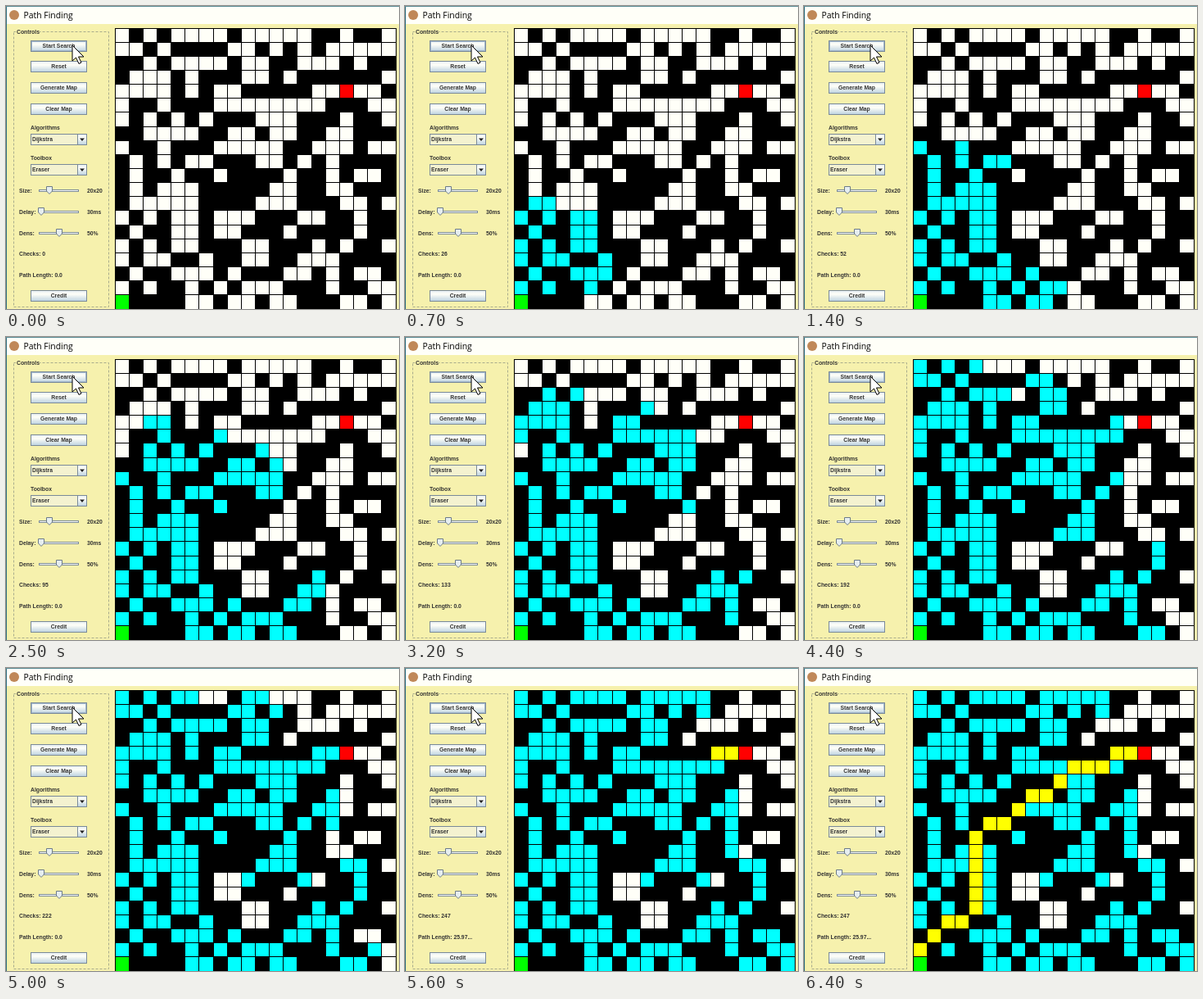
An HTML page with a canvas that plays this animation: 480 px wide and 370 px high, repeating every 6.5 s.

```html
<!DOCTYPE html>
<html lang="en">
<head>
<meta charset="utf-8">
<title>Path Finding</title>
<style>
  html, body { margin: 0; width: 100%; height: 100%; overflow: hidden; background: #f6f1ad; }
  canvas { display: block; }
</style>
</head>
<body>
<canvas id="stage" width="480" height="370"></canvas>
<script>
const ctx = document.getElementById('stage').getContext('2d');
const LOOP = 6500, STEP = 100, CELLS = 20, CELL = 17.15, LEFT = 133, TOP = 27;

// '#' wall, 'o' reached by the search, '.' never reached, S start, F finish
const map = [
  'o#o#oooo#ooooo##.##.',
  'oo#o####oo#o#o#.....',
  '##o#oooo#oo##...#.##',
  '#ooo#o###oo#.######.',
  'oooo#o#oo#####ooF..#',
  'o##o###oooooooo###..',
  'o#o#o#o###ooo###.##.',
  '##oooo##oo#oo##o.###',
  'o##o###ooooo##oo.#..',
  '#o#o#oo###oo#o#o####',
  '#o##o##o####o##o#..#',
  '#o#ooo#####oo##o.###',
  '#ooooo####ooo###oo#.',
  'o#o#oo#..o###o.##o##',
  '#o##oo#..###.####o##',
  'o#o#oo###..###o#o##.',
  'o#oo##o##..##ooo####',
  '#o##ooo#o###oo#o#oo#',
  'o#o##o#o#ooo###o##oo',
  'S####oo#oo#oo###oo#o'
];

// Shortest route, from the finish back to the start
const route = [
  [15, 4], [14, 4], [13, 5], [12, 5], [11, 5], [10, 6], [9, 7],
  [8, 7], [7, 8], [6, 9], [5, 9], [4, 10], [4, 11], [4, 12],
  [4, 13], [4, 14], [4, 15], [3, 16], [2, 16], [1, 17], [0, 18]
];
const ROUTE_START = 5520, ROUTE_STEP = 40;

// Dijkstra with diagonal moves; a cell is revealed when its parent is expanded
function search() {
  const key = (x, y) => y * CELLS + x;
  const open = [{ x: 0, y: 19, cost: 0 }];
  const best = { [key(0, 19)]: 0 }, seen = new Set(), order = [];
  while (open.length) {
    open.sort((a, b) => a.cost - b.cost);
    const node = open.shift();
    if (node.cost > best[key(node.x, node.y)]) continue;
    for (let dx = -1; dx <= 1; dx++) {
      for (let dy = -1; dy <= 1; dy++) {
        const x = node.x + dx, y = node.y + dy, id = key(x, y);
        if (!map[y] || map[y][x] !== 'o') continue;
        const cost = node.cost + Math.hypot(dx, dy);
        if (cost >= (best[id] ?? Infinity) - 1e-9) continue;
        best[id] = cost;
        open.push({ x, y, cost });
        if (!seen.has(id)) {
          seen.add(id);
          order.push({ x, y, at: node.cost });
        }
      }
    }
  }
  return order;
}

const visited = search();

// Progress: time, checks counted, search radius
const progress = [
  [0, 0, 0], [1400, 52, 13], [2500, 95, 18.3],
  [3200, 133, 20.6], [4400, 192, 22.8], [5500, 247, Infinity]
].map(([time, checks, radius]) =>
  ({ time, checks, shown: visited.filter(c => c.at < radius).length }));

function progressAt(t, field) {
  const i = progress.findIndex(p => p.time > t);
  if (i < 0) return progress[progress.length - 1][field];
  const a = progress[i - 1], b = progress[i];
  return Math.round(a[field] + (b[field] - a[field]) * (t - a.time) / (b.time - a.time));
}

function rect(x, y, w, h, fill) {
  ctx.fillStyle = fill;
  ctx.fillRect(x, y, w, h);
}

function outline(x, y, w, h, color) {
  ctx.strokeStyle = color;
  ctx.lineWidth = 1;
  ctx.strokeRect(x + .5, y + .5, w - 1, h - 1);
}

function polygon(points, fill, stroke) {
  ctx.beginPath();
  points.forEach(([x, y]) => ctx.lineTo(x, y));
  ctx.closePath();
  ctx.fillStyle = fill;
  ctx.fill();
  if (stroke) {
    ctx.strokeStyle = stroke;
    ctx.lineWidth = 1;
    ctx.stroke();
  }
}

function label(text, x, y, align = 'left') {
  ctx.font = 'bold 6.8px "Liberation Sans", Arial, sans-serif';
  ctx.textAlign = align;
  ctx.fillStyle = '#333';
  ctx.fillText(text, x, y);
}

function shaded(x, y, w, h) {
  const g = ctx.createLinearGradient(0, y, 0, y + h);
  g.addColorStop(0, '#e4edf2');
  g.addColorStop(.35, '#fffff8');
  g.addColorStop(1, '#b8cfdf');
  rect(x, y, w, h, g);
  outline(x, y, w, h, '#7a8a99');
}

function button(text, y, focused) {
  shaded(30, y, 69, 14);
  if (focused) outline(31, y + 1, 67, 12, '#a3b8cc');
  label(text, 64.5, y + 9.4, 'center');
}

function combo(title, value, y) {
  label(title, 30, y - 5);
  rect(30, y, 69, 14, '#f4f2d0');
  outline(30, y, 69, 14, '#7a8a99');
  label(value, 32, y + 9.4);
  shaded(87, y, 12, 14);
  polygon([[90, y + 5.5], [96, y + 5.5], [93, y + 9]], '#222');
}

function slider(title, value, y, thumb) {
  label(title, 16, y + 2.5);
  label(value, 99, y + 2.5);
  rect(40, y - 1, 49, 3, '#fffff8');
  outline(40, y - 1, 49, 3, '#7a8a99');
  polygon([[thumb - 3.5, y - 4.5], [thumb + 3.5, y - 4.5], [thumb + 3.5, y + 1],
    [thumb, y + 4.5], [thumb - 3.5, y + 1]], '#e6eef0', '#6d7b88');
}

function drawPanel(t) {
  rect(0, 0, 480, 370, '#f6f1ad');
  rect(0, 0, 480, 22, '#fffff8');
  rect(0, 0, 1, 370, '#2f6f80');
  rect(0, 0, 480, 1, '#5c8d96');

  ctx.fillStyle = '#c08858';
  ctx.beginPath();
  ctx.arc(10, 11, 6, 0, 7);
  ctx.fill();
  ctx.font = '10.4px "Open Sans", "Noto Sans", sans-serif';
  ctx.textAlign = 'left';
  ctx.fillStyle = '#000';
  ctx.fillText('Path Finding', 21.5, 14.5);

  ctx.setLineDash([3, 2]);
  outline(9, 31, 117, 337, '#a9ac8c');
  ctx.setLineDash([]);
  rect(12, 28, 29, 7, '#f6f1ad');
  label('Controls', 13, 34);

  button('Start Search', 42, true);
  button('Reset', 67);
  button('Generate Map', 93);
  button('Clear Map', 119);
  combo('Algorithms', 'Dijkstra', 156);
  combo('Toolbox', 'Eraser', 193);
  slider('Size:', '20x20', 225, 53);
  slider('Delay:', '30ms', 251, 43);
  slider('Dens:', '50%', 277, 65);
  label('Checks: ' + progressAt(t, 'checks'), 16, 305);
  label('Path Length: ' + (t >= ROUTE_START ? '25.97...' : '0.0'), 16, 331);
  button('Credit', 347);
}

function cell(x, y, color) {
  const px = Math.floor(LEFT + x * CELL), py = Math.floor(TOP + y * CELL);
  const right = Math.floor(LEFT + (x + 1) * CELL), bottom = Math.floor(TOP + (y + 1) * CELL);
  rect(px + 1, py + 1, right - px - 1, bottom - py - 1, color);
}

function drawGrid(t) {
  const colors = { o: '#fffff8', '.': '#fffff8', S: '#00ff00', F: '#ff0000' };
  rect(LEFT, TOP, 344, 343, '#000');
  map.forEach((row, y) => [...row].forEach((type, x) => {
    if (type !== '#') cell(x, y, colors[type]);
  }));
  visited.slice(0, progressAt(t, 'shown')).forEach(c => cell(c.x, c.y, '#00ffff'));
  const steps = Math.max(0, Math.floor((t - ROUTE_START) / ROUTE_STEP));
  route.slice(0, steps).forEach(([x, y]) => cell(x, y, '#ffff00'));
}

function drawCursor() {
  polygon([[81, 48], [81, 67], [85.5, 63], [89, 70.5], [92, 69], [88.5, 62], [95, 62]],
    '#fff', '#000');
}

function render() {
  const t = Math.floor(performance.now() % LOOP / STEP) * STEP;
  drawPanel(t);
  drawGrid(t);
  drawCursor();
  requestAnimationFrame(render);
}
render();
</script>
</body>
</html>
```
